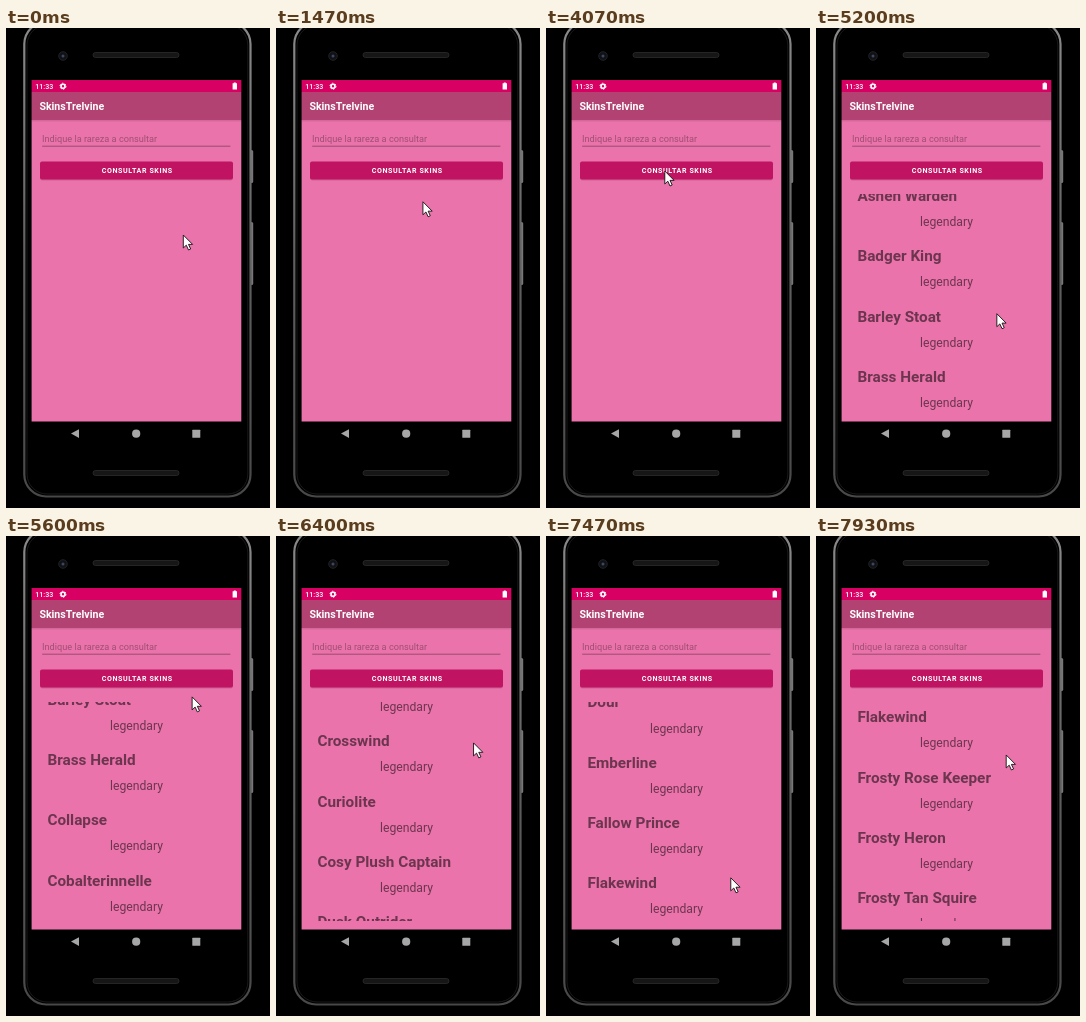
An HTML page that plays this animation: 264 px wide and 480 px high, repeating every 8000 ms.

```html
<!DOCTYPE html>
<html lang="es">
<head>
<meta charset="utf-8">
<title>Consulta de skins</title>
<style>
html, body { margin: 0; width: 100%; height: 100%; overflow: hidden; background: #000; }
svg { display: block; width: 264px; height: 480px; font-family: Roboto, "Noto Sans", sans-serif; }
.clock { font-size: 7.1px; font-weight: 500; fill: #fff; }
.title { font-size: 10.6px; font-weight: 700; fill: #fff; }
.hint { font-size: 9.2px; fill: #000; fill-opacity: .32; }
.action { font-size: 7.1px; font-weight: 700; letter-spacing: .6px; fill: #fff; text-anchor: middle; }
.name { font-size: 15.3px; font-weight: 700; }
.rarity { font-size: 12.2px; text-anchor: middle; }
#rows { fill: #000; fill-opacity: .54; }
#ripple { animation: ripple 8s linear infinite; }
@keyframes ripple {
  0%, 46.6% { r: 0; fill-opacity: .14; }
  50.8%, 100% { r: 110px; fill-opacity: 0; }
}
</style>
</head>
<body>
<svg viewBox="0 0 264 480">
  <defs>
    <linearGradient id="edge" x1="0" x2="0" y1="0" y2="1">
      <stop offset="0" stop-color="#8a8a8a"/>
      <stop offset=".5" stop-color="#606060"/>
      <stop offset="1" stop-color="#484848"/>
    </linearGradient>
    <linearGradient id="shade" x1="0" x2="0" y1="0" y2="1">
      <stop offset="0" stop-opacity=".12"/>
      <stop offset="1" stop-opacity="0"/>
    </linearGradient>
    <clipPath id="listArea"><rect x="26" y="166" width="210" height="219"/></clipPath>
    <clipPath id="buttonArea"><rect x="34" y="133.4" width="193" height="18.2" rx="2"/></clipPath>
  </defs>

  <!-- Phone body -->
  <g fill="#777">
    <rect x="243.5" y="122" width="3.7" height="33" rx="1.5"/>
    <rect x="243.5" y="194" width="3.7" height="63" rx="1.5"/>
  </g>
  <rect x="18.3" y="-6" width="226.2" height="474.5" rx="22" stroke="url(#edge)" stroke-width="2.2"/>
  <rect x="21" y="-3" width="220.8" height="469" rx="20" stroke="#202020" stroke-width=".8"/>
  <circle cx="57" cy="28" r="4.3" fill="#101114" stroke="#26282c" stroke-width=".8"/>
  <circle cx="57" cy="28" r="1.5" fill="#3c4660"/>
  <g fill="#161616" stroke="#2c2c2c" stroke-width=".8">
    <rect x="87" y="24.5" width="86" height="5" rx="2.5"/>
    <rect x="87" y="442.5" width="86" height="5" rx="2.5"/>
  </g>

  <!-- Screen -->
  <rect x="25.6" y="92" width="209.7" height="301.5" fill="#eb73ab"/>
  <rect x="25.6" y="64" width="209.7" height="28" fill="#b24272"/>
  <rect x="25.6" y="92" width="209.7" height="2.5" fill="url(#shade)"/>
  <rect x="25.6" y="52" width="209.7" height="12" fill="#d80062"/>
  <text class="clock" x="29.3" y="60.8">11:33</text>
  <g fill="none" stroke="#fff">
    <circle cx="57" cy="58.2" r="2" stroke-width="1.6"/>
    <circle cx="57" cy="58.2" r="3" stroke-width="1" stroke-dasharray="1.57"/>
  </g>
  <path d="M226.6 55.2h1.2v-.8h2v.8h1.2v6.4h-4.4z" fill="#fff"/>
  <text class="title" x="33.4" y="81.7">SkinsTrelvine</text>
  <text class="hint" x="36" y="114.3">Indique la rareza a consultar</text>
  <path d="M36.2 118.2H224.4" stroke="#000" stroke-opacity=".45" stroke-width=".8"/>
  <rect x="34" y="134.2" width="193" height="18.2" rx="2" fill-opacity=".14"/>
  <rect x="34" y="133.4" width="193" height="18.2" rx="2" fill="#c01463"/>
  <circle id="ripple" cx="119" cy="143" r="0" fill="#fff" clip-path="url(#buttonArea)"/>
  <text class="action" x="131.2" y="145.2">CONSULTAR SKINS</text>
  <g clip-path="url(#listArea)"><g id="rows"></g></g>

  <!-- Navigation -->
  <g fill="#a6a6a6">
    <path d="M65 405.6l8-4.4v8.8z"/>
    <circle cx="130.2" cy="405.7" r="4.1"/>
    <rect x="186.3" y="401.8" width="8" height="8" rx=".5"/>
  </g>

  <path id="cursor" d="M0 0V13L3 10.2 5.2 15 7.4 14 5.2 9.4H9.3Z" fill="#fff" stroke="#111" stroke-width=".9"/>
</svg>
<script>
const LOOP = 8000, STEP = 200 / 3, PITCH = 60.3, LOADED = 4260;
const SLOP = 4, FLING = 184, DECAY = 250, DRIFT = 7;
const names = [
  "Ashen Warden", "Badger King", "Barley Stoat", "Brass Herald", "Collapse",
  "Cobalterinnelle", "Copper Finch", "Cove Rider", "Crosswind", "Curiolite",
  "Cosy Plush Captain", "Dusk Outrider", "Dusk Drifter", "Dimflare", "Dour",
  "Emberline", "Fallow Prince", "Flakewind", "Frosty Rose Keeper",
  "Frosty Heron", "Frosty Tan Squire", "Gale Harper"
];

const button = { x: 118.8, y: 143 };
const hovers = [
  { start: 1400, end: 1530, ...button },
  { start: 2380, end: 2600, x: 100, y: 117 },
  { start: 2600, end: 2870, x: 177, y: 143 },
  { start: 2870, end: 3000, ...button },
  { start: 4535, end: 5000, x: 180, y: 306 }
];
const swipes = [
  { start: 5135, end: 5667, x: 187, from: 306, to: 140 },
  { start: 6067, end: 6487, x: 199, from: 363.5, to: 166 },
  { start: 6633, end: 7170, x: 183.5, from: 320.5, to: 166 },
  { start: 7560, end: 8063, x: 192, from: 371.5, to: 166 }
];

const $ = id => document.getElementById(id);
const rows = $("rows"), cursor = $("cursor");
const clamp = k => Math.min(1, Math.max(0, k));
const lerp = (a, b, k) => a + (b - a) * k;
const smooth = k => k * k * (3 - 2 * k);
const linear = k => k;
const progress = (t, { start, end }) => clamp((t - start) / (end - start));

// Between swipes the pointer glides back to the next touch point.
const moves = hovers.map(h => ({ ...h, ease: smooth }));
for (const { start, end, x, from, to } of swipes) {
  moves.push({ start: moves.at(-1).end, end: start, x: x - DRIFT, y: from, ease: smooth });
  moves.push({ start, end, x, y: to, ease: linear });
}

function pointer(t) {
  let x = 177.3, y = 207;
  for (const m of moves) {
    const k = m.ease(progress(t, m));
    x = lerp(x, m.x, k);
    y = lerp(y, m.y, k);
  }
  return [x, y];
}

// Each swipe drags the list, then flings it until the next touch.
function scrolled(t) {
  return swipes.reduce((sum, s, i) => {
    const drag = (s.from - s.to) * progress(t, s);
    const stop = Math.min(t, swipes[i + 1]?.start ?? LOOP);
    const glide = Math.max(0, stop - s.end);
    return sum + Math.max(0, drag - SLOP) + FLING * (1 - Math.exp(-glide / DECAY));
  }, 0);
}

function addText(cls, x, y, content) {
  const el = document.createElementNS("http://www.w3.org/2000/svg", "text");
  el.setAttribute("class", cls);
  el.setAttribute("x", x);
  el.setAttribute("y", y);
  el.textContent = content;
  rows.append(el);
}
names.forEach((name, i) => {
  const y = 189.3 + i * PITCH;
  addText("name", 41.4, y, name);
  addText("rarity", 130.5, y + 25.1, "legendary");
});

function draw(now) {
  const t = Math.floor((now % LOOP + 4) / STEP) * STEP % LOOP;
  cursor.setAttribute("transform", `translate(${pointer(t)})`);
  rows.setAttribute("transform", `translate(0 ${-scrolled(t)})`);
  rows.setAttribute("visibility", t >= LOADED ? "visible" : "hidden");
}

const start = performance.now();
function tick() {
  draw(performance.now() - start);
  requestAnimationFrame(tick);
}
tick();
</script>
</body>
</html>
```
